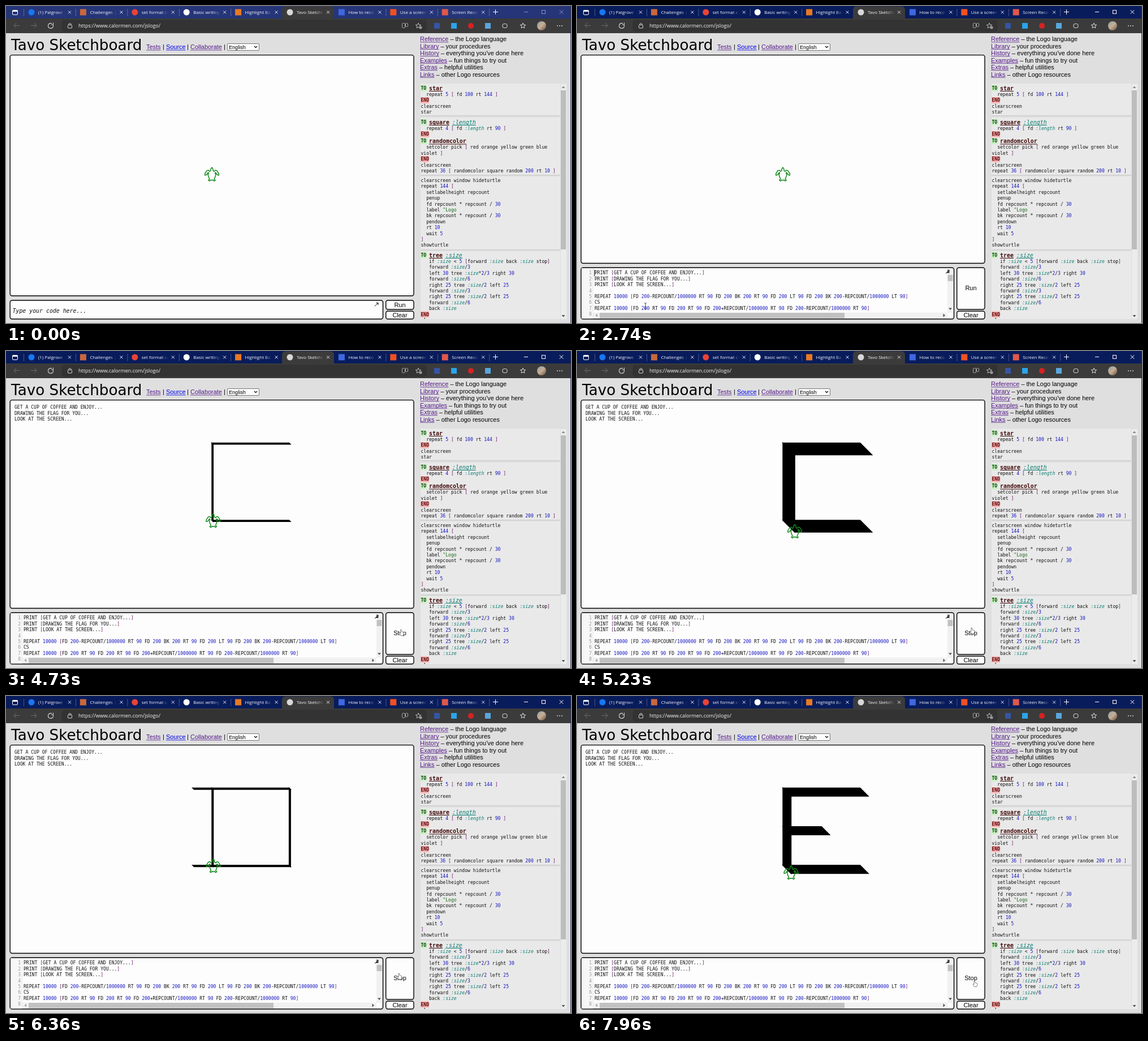
An HTML page with a canvas that plays this animation: 999x560 px, repeating every 8000 ms.

```html
<!DOCTYPE html>
<html lang="en">
<head>
<meta charset="utf-8">
<title>Turtle letters</title>
<style>
html, body { margin: 0; width: 100%; height: 100%; overflow: hidden; background: #dfdfdf; }
canvas { display: block; }
</style>
</head>
<body>
<canvas id="stage" width="999" height="560"></canvas>
<script>
const ctx = document.getElementById('stage').getContext('2d');
const LOOP = 8000, ACTIVE = 2200, PASTE = 2740, RUN = 4360;
const SANS = '"Liberation Sans", sans-serif';
const UI = '"Open Sans", sans-serif';
const MONO = '"DejaVu Sans Mono", monospace';
const PAGE_FONT = `10.93px ${SANS}`;
const CODE_FONT = `8.08px ${MONO}`;

// Places the text so that its capitals are centred on y.
function text(s, x, y, font, color = '#000', align = 'left') {
  const size = parseFloat(font.match(/[\d.]+(?=px)/)[0]);
  ctx.font = font;
  ctx.fillStyle = color;
  ctx.textAlign = align;
  ctx.fillText(s, x, y + size * 0.36);
  return ctx.measureText(s).width;
}

function rect(x, y, w, h, color) {
  ctx.fillStyle = color;
  ctx.fillRect(x, y, w, h);
}

function disc(x, y, r, color) {
  ctx.fillStyle = color;
  ctx.beginPath();
  ctx.arc(x, y, r, 0, 7);
  ctx.fill();
}

function poly(points, { fill, stroke, width = 1, close = false }) {
  ctx.beginPath();
  points.forEach(([x, y]) => ctx.lineTo(x, y));
  if (close || fill) ctx.closePath();
  if (fill) { ctx.fillStyle = fill; ctx.fill(); }
  if (stroke) { ctx.strokeStyle = stroke; ctx.lineWidth = width; ctx.stroke(); }
}

function panel(x, y, w, h, r = 3.5, border = '#000', width = 1.4, fill = '#fdfdfd') {
  ctx.beginPath();
  ctx.roundRect(x, y, w, h, r);
  ctx.fillStyle = fill;
  ctx.fill();
  ctx.strokeStyle = border;
  ctx.lineWidth = width;
  ctx.stroke();
}

function triangle(x, y, dx, dy, color = '#505050') {
  poly([[x + dx * 2, y + dy * 2], [x - dx * 1.5 + dy * 3, y - dy * 1.5 + dx * 3],
        [x - dx * 1.5 - dy * 3, y - dy * 1.5 - dx * 3]], { fill: color });
}

// Browser chrome

const tabs = [
  ['(1) Palgrove', '#1877f2'], ['Challenges |', '#c9683c', 1], ['set format co', '#ea4335'],
  ['Basic writing', '#fff'], ['Highlight Ba', '#e87922', 1], ['Tavo Sketchb', '#d8d8d8'],
  ['How to reco', '#3f67e0', 1], ['Use a screen', '#f25022', 1], ['Screen Reco', '#e0584a', 1],
];

function cross(x, y, r, color) {
  poly([[x - r, y - r], [x + r, y + r]], { stroke: color });
  poly([[x + r, y - r], [x - r, y + r]], { stroke: color });
}

function badge(x, y, r, color, square) {
  if (square) rect(x - r, y - r, 2 * r, 2 * r, color);
  else disc(x, y, r, color);
}

function drawTabs(active) {
  const divider = active ? '#46558c' : '#5c69a2';
  rect(0, 0, 999, 24, active ? '#081c5c' : '#253578');
  panel(488.5, 1, 91, 30, 5, '#3b3b3b', 1, '#3b3b3b');
  panel(11.5, 7.5, 9, 8, 1.5, '#fff', 1, 'transparent');
  rect(11.5, 7.5, 9, 2.5, '#fff');
  rect(31, 5, 1, 13, divider);
  tabs.forEach(([title, color, square], i) => {
    const x = 45 + i * 91.4;
    badge(x, 11, 5.5, color, square);
    const fade = ctx.createLinearGradient(x + 47, 0, x + 59, 0);
    fade.addColorStop(0, '#f4f4f8');
    fade.addColorStop(1, 'rgba(244,244,248,0)');
    text(title, x + 12, 11, `8px ${UI}`, fade);
    cross(x + 67.5, 11, 2.5, '#e4e6f0');
    if (i !== 4 && i !== 5) rect(x + 78, 5, 1, 13, divider);
  });
  poly([[861, 10.5], [870, 10.5]], { stroke: '#fff' });
  poly([[865.5, 6], [865.5, 15]], { stroke: '#fff' });
  const control = active ? '#fff' : '#8b94bd';
  poly([[916, 10.5], [923, 10.5]], { stroke: control });
  ctx.strokeStyle = control;
  ctx.strokeRect(947.5, 7.5, 6, 6);
  cross(982, 10.5, 3.3, control);
}

function star(x, y, color) {
  const points = Array.from({ length: 10 }, (_, i) => {
    const r = i % 2 ? 2.2 : 5, a = i * Math.PI / 5;
    return [x + r * Math.sin(a), y - r * Math.cos(a)];
  });
  poly(points, { stroke: color, close: true });
}

function arrowIcon(x, dir) {
  poly([[x - 5, 34.5], [x + 5, 34.5]], { stroke: '#6c6c6c' });
  poly([[x + dir, 30], [x + dir * 5, 34.5], [x + dir, 39]], { stroke: '#6c6c6c' });
}

function drawToolbar() {
  const ink = '#dcdcdc';
  rect(0, 22, 999, 26, '#3b3b3b');
  panel(99, 25, 644, 20, 4, '#333', 1, '#333');
  arrowIcon(19, -1);
  arrowIcon(49, 1);
  ctx.strokeStyle = ink;
  ctx.lineWidth = 1.2;
  ctx.beginPath();
  ctx.arc(79, 35, 4.5, -0.4, 5.2);
  ctx.stroke();
  poly([[83.5, 29.5], [83.5, 33], [80, 33]], { stroke: ink });
  panel(109.5, 33.5, 7, 5.5, 1, ink, 1, 'transparent');
  ctx.beginPath();
  ctx.arc(113, 33, 2.3, Math.PI, 0);
  ctx.stroke();
  text('https://www.calormen.com/jslogo/', 128, 34.5, `9px ${UI}`, '#f5f5f5');
  panel(700.5, 30.5, 5, 8, 1, '#aaa', 1, 'transparent');
  panel(706.5, 30.5, 4, 6, 1, '#aaa', 1, 'transparent');
  star(729, 35, '#bbb');
  disc(733, 38, 2.6, '#999');
  badge(762, 35, 5, '#3555a5', true);
  badge(792, 35, 5, '#2aa5e8', true);
  disc(822, 35, 5, '#d82222');
  badge(852, 35, 5, '#59a6dd', true);
  panel(878, 31.5, 8, 7, 2.5, ink, 1, 'transparent');
  star(914, 35, ink);
  const photo = ctx.createLinearGradient(940, 28, 954, 42);
  photo.addColorStop(0, '#8fa5ac');
  photo.addColorStop(0.5, '#c9ad91');
  photo.addColorStop(1, '#6f5c4e');
  disc(947, 35, 8, photo);
  [975, 979, 983].forEach(x => disc(x, 35, 0.9, ink));
}

// Page

function link(s, x, y, color = '#551a8b') {
  const w = text(s, x, y, PAGE_FONT, color);
  rect(x, y + 5, w, 0.8, color);
  return w;
}

function drawHeader() {
  text('Tavo Sketchboard', 9, 68.5, '26.2px "DejaVu Sans", sans-serif');
  link('Tests', 248, 72.5);
  text('|', 277, 72.5, PAGE_FONT);
  link('Source', 283, 72.5, '#0000ee');
  text('|', 320, 72.5, PAGE_FONT);
  link('Collaborate', 326, 72.5);
  text('|', 385, 72.5, PAGE_FONT);
  panel(391.5, 66.5, 56, 12, 1.5, '#767676', 1);
  text('English', 394, 72.5, `9.1px ${SANS}`);
  poly([[439, 71], [441.5, 73.5], [444, 71]], { stroke: '#000', width: 1.2 });
  const links = [
    ['Reference', 'the Logo language'], ['Library', 'your procedures'],
    ['History', "everything you've done here"], ['Examples', 'fun things to try out'],
    ['Extras', 'helpful utilities'], ['Links', 'other Logo resources'],
  ];
  links.forEach(([name, note], i) => {
    const y = 58.5 + i * 12.45;
    text(' – ' + note, 732 + link(name, 732, y), y, PAGE_FONT);
  });
}

function code(s, x, y) {
  for (const part of s.match(/:\w+|"\w+|\d+|[\[\]]|[^:"\d\[\]]+/g) || []) {
    const variable = part[0] === ':';
    const color = variable ? '#087d72' : part[0] === '"' ? '#186a18'
      : /^\d/.test(part) ? '#1414c0' : /[\[\]]/.test(part) ? '#6a1668' : '#111';
    x += text(part, x, y, (variable ? 'italic ' : '') + CODE_FONT, color);
  }
}

// Lines starting with "TO" are headings, two leading spaces indent.
const entries = [
  [137, 56, [[145, 'TO star'], [156, '  repeat 5 [ fd 100 rt 144 ]'], [166.5, 'END'],
    [177, 'clearscreen'], [187.5, 'star']]],
  [197, 101, [[205, 'TO square :length'], [216, '  repeat 4 [ fd :length rt 90 ]'], [226.5, 'END'],
    [238.5, 'TO randomcolor'], [249.5, '  setcolor pick [ red orange yellow green blue'],
    [260, 'violet ]'], [270.5, 'END'], [281, 'clearscreen'],
    [291.5, 'repeat 36 [ randomcolor square random 200 rt 10 ]']]],
  [301, 129, 'clearscreen window hideturtle|repeat 144 [|  setlabelheight repcount|  penup|  fd repcount * repcount / 30|  label "Logo|  bk repcount * repcount / 30|  pendown|  rt 10|  wait 5|]|showturtle'
    .split('|').map((s, i) => [308 + i * 10.4, s])],
  [433, 130, 'TO tree :size|   if :size < 5 [forward :size back :size stop]|   forward :size/3|   left 30 tree :size*2/3 right 30|   forward :size/6|   right 25 tree :size/2 left 25|   forward :size/3|   right 25 tree :size/2 left 25|   forward :size/6|   back :size|END|clearscreen'
    .split('|').map((s, i) => [i ? 440.4 + i * 10.45 : 440, s])],
];

function tag(s, y, w, color, ink) {
  rect(733, y - 5.5, w, 11, color);
  text(s, 733.4, y, `bold ${CODE_FONT}`, ink);
}

function heading(s, y) {
  const [word, name, param] = s.split(' ');
  tag(word, y, 11, '#c8f0c0', '#0a3a0a');
  const w = text(name, 748, y, `bold 9.95px ${MONO}`, '#400808');
  rect(748, y + 5, w, 1, '#400808');
  if (!param) return;
  const pw = text(param, 753 + w, y, `italic 9.95px ${MONO}`, '#087d72');
  rect(753 + w, y + 5, pw, 1, '#087d72');
}

function drawHistory() {
  ctx.save();
  ctx.beginPath();
  ctx.rect(728, 136, 271, 417);
  ctx.clip();
  for (const [top, height, lines] of entries) {
    rect(733, top, 247, height, '#e9e9e9');
    rect(733, top + height, 247, 1.5, '#d0d0d0');
    for (const [y, s] of lines) {
      if (s.startsWith('TO ')) heading(s, y);
      else if (s === 'END') tag(s, y, 15, '#f5b4b4', '#5a0505');
      else code(s, 733.4, y);
    }
  }
  ctx.restore();
  rect(981, 138, 10, 415, '#ececec');
  rect(981, 149, 9, 281, '#bdbdbd');
  triangle(985.5, 143.5, 0, -1, '#888');
  triangle(985.5, 547.5, 0, 1);
}

const program = [
  'PRINT [GET A CUP OF COFFEE AND ENJOY...]',
  'PRINT [DRAWING THE FLAG FOR YOU...]',
  'PRINT [LOOK AT THE SCREEN...]',
  '',
  'REPEAT 10000 [FD 200-REPCOUNT/1000000 RT 90 FD 200 BK 200 RT 90 FD 200 LT 90 FD 200 BK 200-REPCOUNT/1000000 LT 90]',
  'CS',
  'REPEAT 10000 [FD 200 RT 90 FD 200 RT 90 FD 200+REPCOUNT/1000000 RT 90 FD 200-REPCOUNT/1000000 RT 90]',
  '',
];

function caret(x, y) {
  rect(x, y, 1, 11.5, '#000');
}

function drawEditor(t) {
  const pasted = t >= PASTE, top = pasted ? 462.2 : 520;
  panel(7.2, top, 659.3, 553 - top);
  if (pasted) {
    rect(8, top + 1, 20, 89, '#f7f7f7');
    rect(28, top + 1, 0.7, 89, '#ddd');
    ctx.save();
    ctx.beginPath();
    ctx.rect(8, 463, 647, 87);
    ctx.clip();
    program.forEach((s, i) => {
      const y = 471.3 + i * 10.45;
      text(i + 1, 26, y, CODE_FONT, '#999', 'right');
      code(s, 31, y);
    });
    ctx.restore();
    rect(29, 541.5, 626, 10.5, '#f1f1f1');
    rect(40, 542, 433, 9.5, '#c1c1c1');
    triangle(34.5, 546.5, -1, 0, '#a3a3a3');
    triangle(649, 546.5, 1, 0);
    rect(655, 464, 10, 78, '#f1f1f1');
    rect(655.5, 475, 9, 11, '#c1c1c1');
    triangle(660, 535, 0, 1);
    triangle(656, 470, 0, -1, '#222');
    if (t < 3270 || (t >= 3800 && t < 4150)) caret(30.5, 466);
  } else {
    text('Type your code here...', 11.5, 538, `italic 9.9px ${MONO}`, '#111');
    if (t >= ACTIVE) caret(11, 532);
  }
  const y = top + 7.5;
  poly([[652, y + 3], [658, y - 3]], { stroke: '#000' });
  poly([[654.5, y - 3], [658, y - 3], [658, y + 0.5]], { stroke: '#000' });
  panel(671.7, top, 49.3, 536 - top);
  text(t >= RUN ? 'Stop' : 'Run', 696.5, pasted ? 498.5 : 528, PAGE_FONT, '#000', 'center');
  panel(671.7, 539, 49.3, 14);
  text('Clear', 696.5, 545.8, PAGE_FONT, '#000', 'center');
}

// Turtle drawing: each letter's strokes drift diagonally while it repeats.

const HOME = { x: 364, y: 299 }, SCALE = 0.683, DRIFT = 50 * SCALE;
const bar = (y, to = 200, from = 0) => [from, y, to, y];
const post = x => [x, 0, x, 200];
const letters = [
  { start: 4480, end: 5435, strokes: [post(0), bar(200), bar(0)] },
  { start: 5435, end: 6130, strokes: [post(0), post(200), bar(200), bar(0)] },
  { start: 6130, end: 6967, strokes: [post(0), post(200), bar(200, 200, -50), bar(0, 200, -50)] },
  { start: 6967, end: 8490, strokes: [post(0), bar(200), bar(100, 100), bar(0)] },
];

function sweep([x1, y1, x2, y2], d) {
  const ax = HOME.x + x1 * SCALE, ay = HOME.y - y1 * SCALE;
  const bx = HOME.x + x2 * SCALE, by = HOME.y - y2 * SCALE;
  poly([[ax, ay], [bx, by], [bx + d, by + d], [ax + d, ay + d]],
    { fill: '#000', stroke: '#000', width: 1.4 });
}

function drawTurtle(d) {
  const half = [[0, -20], [2.5, -17], [3, -12], [6, -10], [9, -13], [13, -12], [18, -4], [18, 0],
    [14, -1], [10, -7], [8, -6], [10, -2], [9, 3], [6, 10], [9, 13], [6, 15], [3, 12], [0, 13]];
  const mirror = half.slice(1, -1).reverse().map(([x, y]) => [-x, y]);
  const points = half.concat(mirror)
    .map(([x, y]) => [HOME.x + d + x * SCALE, HOME.y + d + y * SCALE]);
  ctx.lineJoin = 'round';
  poly(points, { stroke: '#148a1c', width: 1.5, close: true });
  ctx.lineJoin = 'miter';
}

function drawCanvas(t) {
  panel(7.2, 86.6, 713.8, (t >= PASTE ? 454.5 : 512) - 86.6);
  if (t >= RUN) {
    program.slice(0, 3).forEach((s, i) =>
      text(s.slice(7, -1), 15, 99.5 + i * 10.45, CODE_FONT, '#111'));
  }
  const letter = letters.find(l => t >= l.start && t < l.end);
  const part = letter ? (t - letter.start) / (letter.end - letter.start) : 0;
  const drift = DRIFT * part * part;
  if (letter) letter.strokes.forEach(s => sweep(s, drift));
  drawTurtle(drift);
}

// Mouse pointer

const path = [
  [1610, 217, 464], [2000, 121, 516], [2200, 121, 516], [2290, 121, 530], [3460, 121, 530],
  [3800, 700, 500], [4360, 700, 500], [5160, 699, 494], [6020, 696, 495], [6800, 696, 495],
  [7150, 705, 513], [7350, 707, 523], [7640, 705, 511], [7960, 704, 508],
];

function pointerAt(t) {
  const i = path.findIndex(p => p[0] > t);
  if (i < 0) return path[path.length - 1].slice(1);
  const [t0, x0, y0] = path[i - 1], [t1, x1, y1] = path[i];
  const k = (t - t0) / (t1 - t0), ease = k * k * (3 - 2 * k);
  return [x0 + (x1 - x0) * ease, y0 + (y1 - y0) * ease];
}

function drawPointer(t) {
  if (t < path[0][0]) return;
  const [x, y] = pointerAt(t);
  const shape = points => poly(points.map(([px, py]) => [x + px, y + py]),
    { fill: '#fff', stroke: '#666', width: 0.8 });
  if (x > 671) {
    shape([[-2, -5], [-0.5, -5], [0, -1.5], [3.5, -0.5], [4, 2], [2.5, 5.5], [-1.5, 5.5],
      [-4, 1.5], [-3.5, 0.5], [-2, 1.5]]);
  } else if (t < ACTIVE) {
    shape([[-1, -4], [-1, 3.5], [0.7, 2], [2, 5], [3, 4.5], [1.8, 1.6], [4, 1.4]]);
  } else {
    rect(x - 0.4, y - 5, 0.9, 10, '#333');
    rect(x - 2, y - 5.5, 4, 0.8, '#333');
    rect(x - 2, y + 4.7, 4, 0.8, '#333');
  }
}

function draw(t) {
  rect(0, 0, 999, 560, '#dfdfdf');
  drawTabs(t >= ACTIVE);
  drawToolbar();
  drawHeader();
  drawHistory();
  drawCanvas(t);
  drawEditor(t);
  rect(998, 0, 1, 560, '#2a3150');
  drawPointer(t);
}

const began = performance.now();
function tick() {
  draw((performance.now() - began) % LOOP);
  requestAnimationFrame(tick);
}
tick();
</script>
</body>
</html>
```
